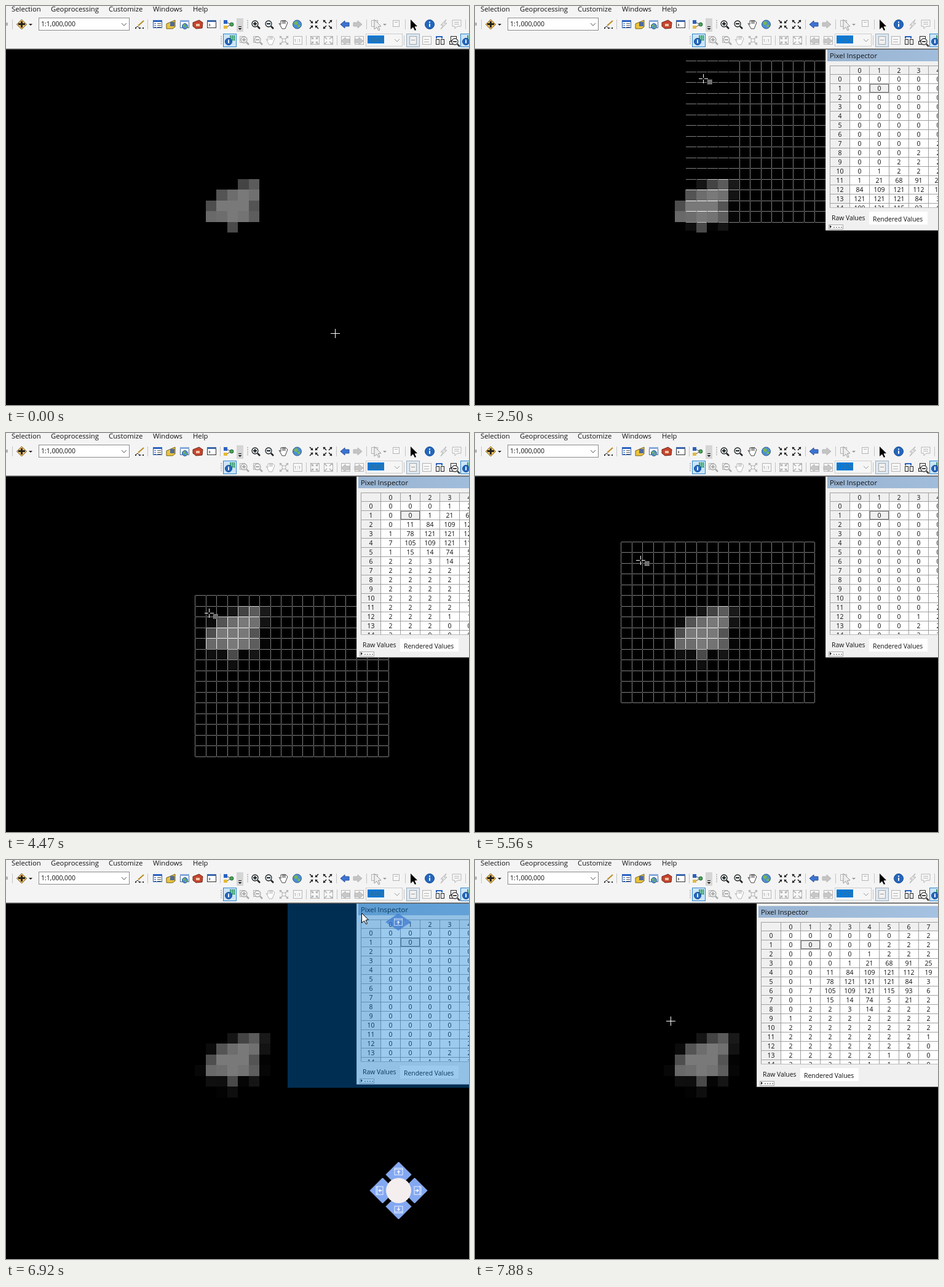
Write an HTML page with a canvas that moves like this. It is 753x650 px and loops after 8000 ms.

```html
<!DOCTYPE html>
<html>
<head>
<meta charset="utf-8">
<style>
  html, body { margin: 0; width: 100%; height: 100%; overflow: hidden; background: #000; }
  canvas { display: block; }
</style>
</head>
<body>
<canvas id="stage" width="753" height="650"></canvas>
<script>
const g = document.getElementById('stage').getContext('2d');
const LOOP = 8000, CELL = 17.5, ORIGIN_X = 290, ORIGIN_Y = 229.5;
const FONT = '"Open Sans", sans-serif';
const GRAY = '#b4b4b4', INK = '#222', BLUE = '#2a62c0', PALE = '#f7f7f7';

// ---------- drawing helpers ----------
function box(x, y, w, h, fill, stroke) {
  if (fill) { g.fillStyle = fill; g.fillRect(x, y, w, h); }
  if (stroke) { g.strokeStyle = stroke; g.lineWidth = 1; g.strokeRect(x + .5, y + .5, w - 1, h - 1); }
}
function trace(x, y, points) {
  g.beginPath();
  for (let i = 0; i < points.length; i += 2) g.lineTo(x + points[i], y + points[i + 1]);
}
function shape(x, y, points, fill, stroke) {
  trace(x, y, points);
  g.closePath();
  g.fillStyle = fill; g.fill();
  if (stroke) { g.strokeStyle = stroke; g.lineWidth = 1; g.stroke(); }
}
function line(x, y, points, color, width = 1) {
  trace(x, y, points);
  g.strokeStyle = color; g.lineWidth = width; g.stroke();
}
function disc(x, y, r, fill, stroke, width = 1) {
  g.beginPath(); g.arc(x, y, r, 0, 7);
  g.fillStyle = fill; g.fill();
  if (stroke) { g.strokeStyle = stroke; g.lineWidth = width; g.stroke(); }
}
function diamond(x, y, rx, ry, fill, stroke) {
  shape(x, y, [0, -ry, rx, 0, 0, ry, -rx, 0], fill, stroke);
}
function text(s, x, y, size, color = '#111', align = 'left') {
  g.font = size + 'px ' + FONT;
  g.textAlign = align; g.fillStyle = color; g.fillText(s, x, y);
}

// ---------- raster ----------
const island = [
  [0, 0, 0, 1, 21, 68, 91, 25],
  [0, 0, 11, 84, 109, 121, 112, 19],
  [0, 1, 78, 121, 121, 121, 84, 3],
  [0, 7, 105, 109, 121, 115, 93, 6],
  [0, 1, 15, 14, 74, 5, 21, 2],
  [0, 2, 2, 3, 14, 2, 2, 2]];

function rasterValue(c, r) {
  if (r < 3) return c < 6 - r ? 0 : r === 2 && c === 4 ? 1 : 2;
  if (r < 9) return c < 0 ? 0 : c > 7 ? 2 : island[r - 3][c];
  const left = -Math.floor((r - 9) / 2);
  if (c < left) return 0;
  if (c === left && r % 2) return 1;
  const right = 19 - r + (r === 14 ? 1 : 0);
  if (r > 10 && c >= right) return 0;
  return r > 10 && c >= 18 - r && r % 3 ? 1 : 2;
}
const cellX = c => Math.floor(ORIGIN_X + c * CELL);
const cellY = r => Math.floor(ORIGIN_Y + r * CELL);

function drawIsland(t) {
  const paint = test => island.forEach((row, i) => row.forEach((v, c) => {
    if (!test(v)) return;
    const x = cellX(c), y = cellY(i + 3);
    box(x, y, cellX(c + 1) - x, cellY(i + 4) - y, `rgb(${v},${v},${v})`);
  }));
  paint(v => v > 60);
  if (t < 640) return;
  // the faint cells become visible as more of the map is refreshed
  g.save();
  g.beginPath();
  g.rect(t < 1960 ? 402 : t < 3050 ? 342 : 0, 71, 753, t >= 1960 && t < 3050 ? 295 : 579);
  g.clip();
  paint(v => v > 2 && v <= 60);
  g.restore();
}

function drawGrid(c0, r0, firstVertical) {
  g.save();
  g.beginPath(); g.rect(0, 71, 753, 579); g.clip();
  g.globalCompositeOperation = 'lighter';
  for (let r = 0; r <= 15; r++) for (let c = 0; c <= 18; c++) {
    const x = cellX(c0 + c), y = cellY(r0 + r);
    if (c < 18) box(x + 1, y, cellX(c0 + c + 1) - x - 1, 1, '#808080');
    if (r < 15 && x >= firstVertical) box(x, y + 1, 1, cellY(r0 + r + 1) - y - 1, '#808080');
  }
  g.restore();
}

// ---------- inspector ----------
function drawPanel(x, y, c0, r0) {
  g.save();
  g.translate(x, y);
  box(0, 0, 400, 299, '#f0f0f0');
  box(0, 0, 1, 299, '#d8d8d8');
  box(0, 298, 400, 1, '#8c8c8c');
  const title = g.createLinearGradient(0, 0, 300, 0);
  title.addColorStop(0, '#99b4d1'); title.addColorStop(1, '#a5c2e2');
  box(3, 4, 400, 19, title);
  text('Pixel Inspector', 7, 18, 11.3);

  g.save();
  g.beginPath(); g.rect(7, 30, 400, 232); g.clip();
  box(7, 30, 400, 232, '#fff');
  box(7, 30, 400, 15, '#f0f0f0');
  box(7, 30, 32, 232, '#f0f0f0');
  box(72, 60, 31, 14, '#f0f0f0');
  for (let c = -1; c < 9; c++) for (let r = -1; r < 15; r++) {
    if (c < 0 && r < 0) continue;
    const label = r < 0 ? c : c < 0 ? r : rasterValue(c0 + c, r0 + r);
    text(label, 55.5 + c * 32, r < 0 ? 41.5 : 56 + r * 15, 10.5, '#111', 'center');
  }
  for (let c = 0; c < 10; c++) box(7 + c * 32, 30, 1, 232, '#a0a0a0');
  for (let r = 0; r < 17; r++) box(7, r ? 29 + r * 15 : 30, 400, 1, '#a0a0a0');
  box(72, 60, 31, 14, null, '#777');
  g.restore();

  box(7, 261, 400, 1, '#bbb');
  text('Raw Values', 10, 282, 10.4);
  box(71, 268, 95, 21, '#fff');
  text('Rendered Values', 77, 284, 10.4);
  box(5, 289, 24, 8, '#fafafa', '#aaa');
  shape(7, 290, [0, 0, 3, 2.5, 0, 5], INK);
  for (let i = 0; i < 4; i++) box(13 + i * 4, 293, 2, 1, '#555');
  g.restore();
}

// ---------- toolbar ----------
const separator = (x, y) => box(x, y - 8, 1, 16, '#c4c4c4');
const caret = (x, y, color) => shape(x, y, [-3, -1, 3, -1, 0, 2], color);
const chevron = (x, y, color) => line(x, y, [-4, -2, 0, 2, 4, -2], color);
function grip(x, y) { for (let i = -7; i < 8; i += 3) box(x, y + i, 2, 1, '#999'); }

function magnifier(x, y, plus, color, glass) {
  line(x, y, [3, 3, 7, 7], color, 2.5);
  disc(x - 1, y - 1, 5, glass, color, 1.3);
  box(x - 4, y - 2, 6, 2, color);
  if (plus) box(x - 2, y - 4, 2, 6, color);
}
function hand(x, y, color) {
  shape(x, y, [-7, -2, -4, 0, -4, -6, 4, -6, 7, -3, 3, 7, -2, 7], '#fff', color);
  for (let i = -1; i < 4; i += 2) line(x, y, [i, -7, i, -1], color);
}
function cornerArrows(x, y, inward, color) {
  for (const sx of [-1, 1]) for (const sy of [-1, 1]) {
    const tip = inward ? 2 : 7, tail = 9 - tip, d = inward ? 4 : -4;
    line(x, y, [sx * tail, sy * tail, sx * tip, sy * tip], color, 1.6);
    shape(x, y, [sx * tip, sy * tip, sx * (tip + d), sy * tip, sx * tip, sy * (tip + d)], color);
  }
}
function wideArrow(x, y, dir, fill, stroke) {
  const d = 7 * dir;
  shape(x, y, [-d, 0, 0, -6, 0, -3, d, -3, d, 3, 0, 3, 0, 6], fill, stroke);
}
function info(x, y, r) {
  disc(x, y, r, '#2467bd', '#164a92');
  box(x - 1, y - r * .6, 2, 2, '#fff');
  box(x - 1, y - 1, 2, r * .65, '#fff');
}
function globe(x, y, r) {
  disc(x, y, r, '#4b8fd8', '#345d86');
  disc(x - r * .25, y - r * .3, r * .42, '#79b74a');
  disc(x + r * .4, y + r * .35, r * .3, '#79b74a');
}
function sheet(x, y, frame, head) {
  box(x - 7, y - 6, 15, 13, '#fff', frame);
  box(x - 7, y - 6, 15, 3, head);
}
function grayTile(x, y) {
  box(x - 7, y - 7, 15, 14, PALE, GRAY);
}
function pointerShape(x, y, fill, stroke) {
  shape(x, y, [0, 0, 0, 16, 4, 12.5, 7, 18, 9, 17, 6.5, 11.5, 11, 11], fill, stroke);
}
function inspectorButton(x) {
  box(x, 45, 22, 22, '#cce4f7', '#2a86cf');
  box(x + 11, 48, 9, 9, '#12805a');
  for (let i = 0; i < 3; i++) {
    box(x + 13 + i * 3, 48, 1, 9, '#9fe0c0');
    box(x + 11, 50 + i * 3, 9, 1, '#9fe0c0');
  }
  info(x + 9, 58, 5.5);
}

function drawUpperRow() {
  box(0, 27, 3, 5, GRAY);
  for (const x of [10, 230, 348, 537, 586, 649, 747]) separator(x, 30);
  diamond(25.5, 30, 8, 8, '#f3c45c', '#6c4a12');
  box(24, 25, 3, 10, INK); box(20, 28, 11, 3, INK);
  caret(40, 30, INK);
  box(53, 19, 148, 21, '#fff', '#8a8a8a');
  text('1:1,000,000', 57, 33, 10.5);
  chevron(192, 30, '#555');
  line(217, 30, [-7, 6, -3, 3, 0, 6, 3, 6], INK);
  line(217, 30, [-2, 2, 7, -6], '#b98a22', 2);
  for (let i = 0; i < 3; i++) box(210 + i * 6, 35, 2, 2, INK);

  sheet(246, 29, '#2a5ca5', BLUE);
  for (let y = 28; y < 35; y += 3) { box(241, y, 3, 1, BLUE); box(246, y, 6, 1, '#555'); }
  shape(268, 30, [-7, -1, 7, -7, 7, 4, 3, 7, -7, 7], '#eac43c', '#77601a');
  box(267, 26, 7, 7, '#506a9c');
  sheet(290, 29, '#496b98', '#86a9dc'); globe(291, 33, 4.5);
  shape(312, 30, [-8, -3, 2, -7, 8, -3, 7, 6, -3, 7, -8, 3], '#c6442d', '#6d2a1c');
  box(309, 29, 6, 4, '#f0c7a9');
  sheet(334, 29, '#333', '#3c65a8');
  line(334, 30, [-4, -1, -2, 1, -4, 3], INK);
  line(362, 30, [-4, -4, 4, 0, -4, 5], '#555');
  box(354, 23, 6, 6, BLUE); box(354, 32, 6, 5, '#e2b93d'); disc(367, 30, 3, '#48a354', '#28643a');
  box(375, 20, 11, 22, '#d5d5d5');
  box(378, 33, 5, 1, INK); caret(380.5, 37, INK);
  grip(392, 30);
  magnifier(406, 30, true, INK, '#e5f3fb'); magnifier(428, 30, false, INK, '#e5f3fb');
  hand(451, 30, '#444');
  globe(473.5, 30, 7);
  cornerArrows(501, 30, true, INK); cornerArrows(523, 30, false, INK);
  wideArrow(551, 30, 1, '#3d73d2', '#28509c'); wideArrow(572, 30, -1, '#c4c4c4', GRAY);
  box(594, 23, 11, 11, '#f2f2f2', GRAY);
  pointerShape(599, 22, '#eee', '#999');
  caret(616, 30, '#999');
  box(629, 23, 11, 11, PALE, GRAY); box(632, 26, 5, 1, GRAY);
  pointerShape(658, 22, '#000');
  info(689, 30, 7.5);
  shape(712, 30, [4, -8, -5, 1, -1, 1, -5, 8, 5, -2, 1, -2], '#e5e5e5', GRAY);
  shape(733, 30, [-7, -7, 7, -7, 7, 3, 1, 3, -3, 7, -3, 3, -7, 3], '#f8f8f8', GRAY);
  box(729, 26, 8, 1, GRAY); box(729, 29, 8, 1, GRAY);
}

function drawLowerRow() {
  grip(349, 56);
  inspectorButton(353);
  for (const x of [386, 408]) {
    box(x - 6, 49, 9, 11, '#f4f4f4', GRAY);
    magnifier(x + 2, 56, x < 400, '#aaa', '#f4f4f4');
  }
  hand(430, 56, GRAY);
  cornerArrows(452, 56, false, GRAY); disc(452, 56, 3, '#f4f4f4', GRAY);
  grayTile(474, 56); text('1:1', 474, 59, 8, '#999', 'center');
  for (const x of [488, 538, 647]) separator(x, 56);
  for (const x of [502, 524]) { grayTile(x, 56); cornerArrows(x, 56, x < 510, GRAY); }
  for (const x of [552, 574]) { grayTile(x, 56); wideArrow(x, 57, x < 560 ? 1 : -1, '#c8c8c8', GRAY); }
  box(585, 45, 60, 21, '#f6f6f6', '#ccc');
  box(588, 48, 27, 13, '#0078d7');
  text('100%', 589, 59, 10.5, '#56718c');
  chevron(636, 56, '#999');
  box(651, 45, 22, 22, '#dce8f2', '#9dacb8');
  box(656, 49, 12, 14, '#f0f0f0', '#a8a8a8'); box(659, 55, 6, 1, '#999');
  grayTile(684, 56); box(680, 54, 8, 1, GRAY); box(680, 58, 8, 1, GRAY);
  for (const x of [699, 707]) box(x, 54, 6, 9, '#fff', INK);
  line(705, 52, [-5, 1, -5, -2, 4, -2, 4, 1], BLUE, 2);
  box(723, 49, 10, 8, '#fff', INK); box(721, 57, 9, 6, '#ddd', INK);
  magnifier(731, 59, false, '#444', '#fff');
  inspectorButton(739);
}

function drawToolbar() {
  box(0, 0, 753, 69, '#f4f4f4');
  box(0, 69, 753, 1, '#a0a0a0'); box(0, 70, 753, 1, '#555');
  const menus = { Selection: 9, Geoprocessing: 73, Customize: 167, Windows: 239, Help: 304 };
  for (const name in menus) text(name, menus[name], 9, 11.3);
  drawUpperRow();
  drawLowerRow();
}

// ---------- docking guides ----------
function dockGlyph(x, y) {
  box(x - 7, y - 6, 14, 12, null, '#eaf2ff');
  box(x - 7, y - 4, 14, 1, '#eaf2ff');
  line(x, y, [0, 4, 0, -1], '#fff', 1.5);
  shape(x, y, [-3, 1, 0, -2, 3, 1], '#fff');
}
function drawDocking(x) {
  box(x, 71, 753 - x, 300, 'rgba(0,120,212,.39)');
  g.globalAlpha = .7;
  diamond(638, 101, 21, 14, '#3a78d0');
  dockGlyph(638, 101);
  g.globalAlpha = 1;
  g.save();
  g.translate(638.5, 538.5);
  for (let i = 0; i < 4; i++) {
    diamond(0, -26, 20.5, 20.5, '#83a8f2', '#9dbcfa');
    dockGlyph(0, -31);
    g.rotate(Math.PI / 2);
  }
  disc(0, 0, 20.5, '#f4eeee');
  g.restore();
}

// ---------- pointer ----------
const CROSS = 0, ARROW = 1, PROBE = 2;
function drawPointer(x, y, kind) {
  if (kind === ARROW) return pointerShape(x + .5, y + .5, '#fff', '#000');
  for (let d = kind === PROBE ? 2 : 0; d < 8; d++)
    for (const s of [-d, d]) { box(x + s, y, 1, 1, '#fff'); box(x, y + s, 1, 1, '#fff'); }
  if (kind !== PROBE) return;
  for (let i = 0; i < 8; i++) for (let j = 0; j < 8; j++)
    box(x + 7 + i, y + 2 + j, 1, 1, i % 2 && j % 2 ? '#000' : (i + j) % 2 ? '#777' : '#ccc');
}
function pointerKind(t) {
  if (t < 900) return CROSS;
  if (t < 2140) return ARROW;
  if (t < 5690) return PROBE;
  if (t < 6250) return CROSS;
  if (t < 7330) return ARROW;
  return t >= 7490 && t < 7880 ? PROBE : CROSS;
}

// the screen updates in bursts: start, end, interval
const bursts = [
  [640, 1680, 130], [1960, 2640, 180], [3050, 3980, 133], [4100, 5140, 123.4],
  [5290, 6260, 135], [6380, 7340, 135], [7490, 7880, 130]];

function lastUpdate(t) {
  const burst = bursts.filter(b => b[0] <= t).pop();
  if (!burst) return 0;
  const [start, end, interval] = burst;
  return t >= end ? end : start + Math.floor((t - start) / interval) * interval;
}

// time, x, y
const route = [
  [0, 535, 533], [640, 455, 380], [770, 410, 180], [900, 380, 76], [1030, 372, 55],
  [1680, 363, 47], [1960, 363, 47], [2140, 456, 118], [2320, 456, 118], [2500, 371, 118],
  [2640, 371, 118], [3050, 365, 100], [3450, 312, 180], [3850, 298, 272], [4100, 316, 284],
  [4470, 330, 293], [4720, 312, 309], [5140, 278, 228], [5560, 269, 207], [5710, 269, 207],
  [6260, 581, 86], [6380, 578, 86], [6920, 578, 86], [7190, 466, 90], [7340, 331, 250],
  [7490, 322, 258], [7750, 318, 262], [LOOP, 318, 262]];

function pointerAt(t) {
  const next = Math.max(1, route.findIndex(p => p[0] >= t));
  const [t0, x0, y0] = route[next - 1], [t1, x1, y1] = route[next];
  const k = (t - t0) / (t1 - t0);
  return [Math.round(x0 + (x1 - x0) * k), Math.round(y0 + (y1 - y0) * k)];
}
// the inspector keeps the values of the last probed place
function lastProbe(t) {
  if (t < 2140) return 2140;
  return t >= 5690 && t < 7490 ? 5560 : Math.min(t, 7750);
}

function draw(now) {
  const t = lastUpdate(now);
  const [x, y] = pointerAt(t), kind = pointerKind(t);
  const [probeX, probeY] = pointerAt(lastProbe(t));
  const c0 = Math.floor((probeX - ORIGIN_X) / CELL) - 1;
  const r0 = Math.floor((probeY - ORIGIN_Y) / CELL) - 1;

  box(0, 0, 753, 650, '#000');
  drawIsland(t);
  if (kind === PROBE) drawGrid(c0, r0, t >= 2500 && t < 2640 ? 430 : 0);
  const moved = t >= 7190;
  if (t >= 1960) drawPanel(moved ? 458 : 570, moved ? 71 : 67, c0, r0);
  drawToolbar();
  if (t >= 6650 && !moved) drawDocking(t < 6785 ? 540 : t < 6920 ? 495 : 458);
  drawPointer(x, y, kind);
}

function tick() {
  draw(performance.now() % LOOP);
  requestAnimationFrame(tick);
}
tick();
</script>
</body>
</html>
```
